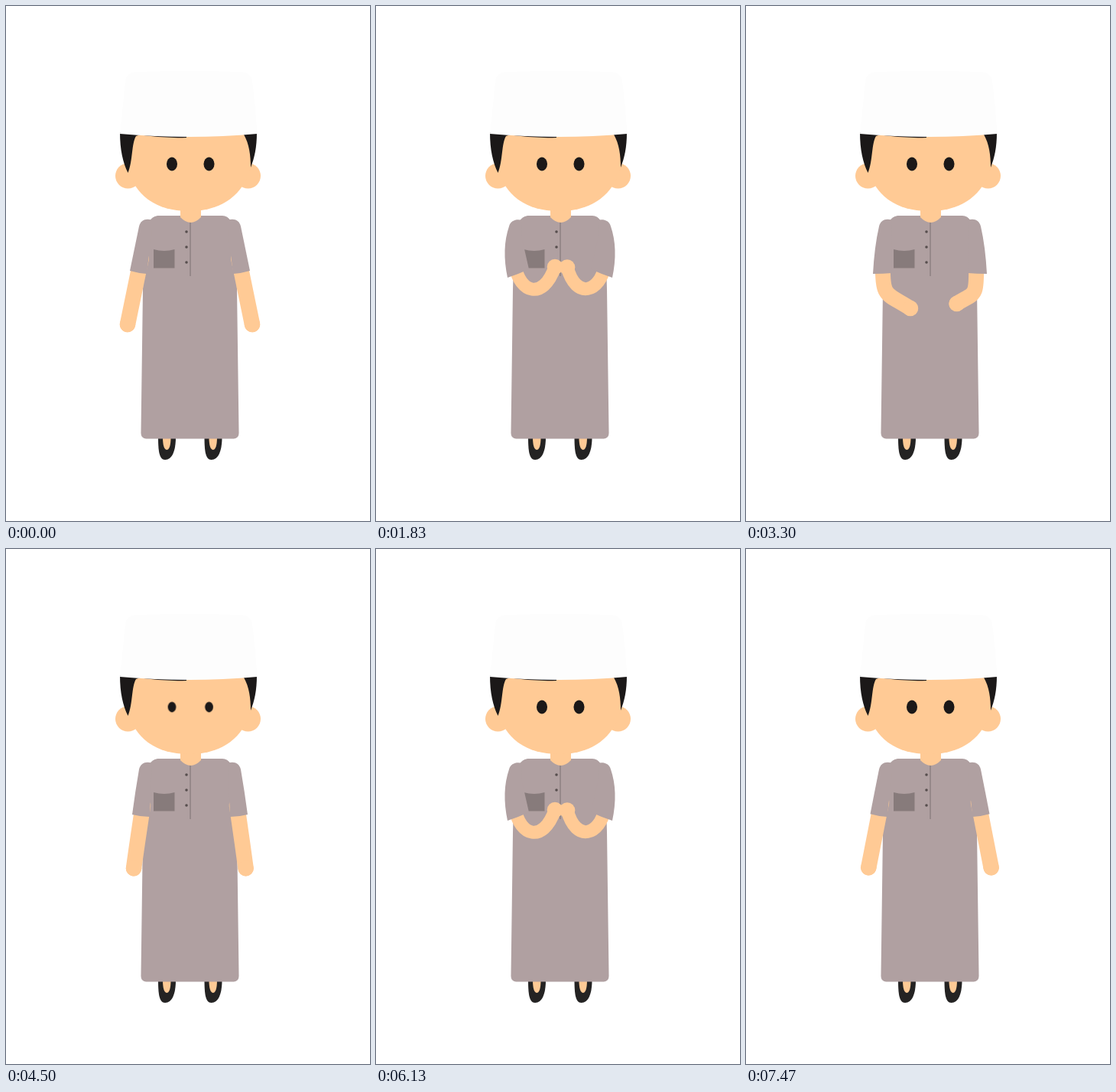
Animation, 476 px wide and 673 px high, one loop 7.51 s. Source, as an HTML page without scripts:

```html
<!DOCTYPE html>
<html lang="en">
<head>
<meta charset="utf-8">
<title>Boy raising his hands</title>
<style>
  html, body { margin: 0; width: 100%; height: 100%; overflow: hidden; background: #fff; }
  svg { display: block; width: 476px; height: 673px; }

  .skin { fill: #ffca95; }
  .shirt { fill: #b0a0a1; }
  .dark { fill: #1b1818; }
  .shoe { fill: #242323; }
  .pocket { fill: #877b7b; }
  .button { fill: #574e4e; }
  .seam { stroke: #85797a; stroke-width: 1.2; }
  .cap { fill: #fdfdfd; }

  .arm { fill: none; stroke: #ffca95; stroke-linecap: round; marker-end: url(#hand); }
  .arm, .sleeve, .eye { animation: 3755ms linear infinite; }
  .arm.left { animation-name: left-arm; }
  .arm.right { animation-name: right-arm; }
  .sleeve { animation-name: sleeve; }
  .eye { animation-name: blink; transform-box: fill-box; transform-origin: center; }

  /* Poses: hanging, lifting, half way, nearly joined, joined */
  @keyframes left-arm {
    0%, 12.9%, 100% { d: path("M176.7 330C171 358 165 387 159 416"); stroke-width: 20.5px; }
    19.8%, 93.9% { d: path("M179 335C175 362 170.5 390 166.5 417.5"); stroke-width: 20.5px; }
    25.8%, 87.9% { d: path("M179 338C178 382 184 375 215 395"); stroke-width: 20px; }
    30.8%, 83% { d: path("M180 340C184 380 198 378 229 365"); stroke-width: 18.5px; }
    43.9%, 69.2% { d: path("M182 340C188 374 218 386 234 341"); stroke-width: 17px; }
    12.9% { animation-timing-function: cubic-bezier(.5, 0, .8, .7); }
    30.8% { animation-timing-function: cubic-bezier(.15, .6, .4, 1); }
    69.2% { animation-timing-function: cubic-bezier(.6, 0, .85, .4); }
    93.9% { animation-timing-function: cubic-bezier(.2, .3, .5, 1); }
  }
  @keyframes right-arm {
    0%, 12.9%, 100% { d: path("M304.3 330C310 358 316 387 322 416"); stroke-width: 20.5px; }
    19.8%, 93.9% { d: path("M302 335C306 362 310 390 314 417.5"); stroke-width: 20.5px; }
    25.8%, 87.9% { d: path("M301 338C302 382 299 374 275.5 389"); stroke-width: 20px; }
    30.8%, 83% { d: path("M301 340C297 380 283 376 257.5 364"); stroke-width: 18.5px; }
    43.9%, 69.2% { d: path("M299 340C293 373 262 385 250 341.5"); stroke-width: 17px; }
    12.9% { animation-timing-function: cubic-bezier(.5, 0, .8, .7); }
    30.8% { animation-timing-function: cubic-bezier(.15, .6, .4, 1); }
    69.2% { animation-timing-function: cubic-bezier(.6, 0, .85, .4); }
    93.9% { animation-timing-function: cubic-bezier(.2, .3, .5, 1); }
  }
  @keyframes sleeve {
    0%, 12.9%, 100% { d: path("M174 288C176 279 184 277 191 280L190 300L184 350Q172 349 162 346Q168 317 174 288Z"); }
    19.8%, 93.9% { d: path("M174 288C176 279 184 277 191 280L190 300L188 350Q176 350 165 347Q169 317 174 288Z"); }
    25.8%, 87.9% { d: path("M174 288C176 279 184 277 191 280L190 300L191 349Q179 350 166 350Q168 314 174 288Z"); }
    30.8%, 83% { d: path("M174 288C176 279 184 278 191 280L190 300L197.5 344.5Q184 350 170 353Q166 315 174 288Z"); }
    43.9%, 69.2% { d: path("M174 288C176 280 184 278 191 280L190 300L200 344Q187 350 172 355Q164 317 174 288Z"); }
    12.9% { animation-timing-function: cubic-bezier(.5, 0, .8, .7); }
    30.8% { animation-timing-function: cubic-bezier(.15, .6, .4, 1); }
    69.2% { animation-timing-function: cubic-bezier(.6, 0, .85, .4); }
    93.9% { animation-timing-function: cubic-bezier(.2, .3, .5, 1); }
  }
  @keyframes blink {
    0%, 18.6%, 27.2%, 78.3%, 86.8%, 100% { transform: scale(1); }
    22.9%, 82.6% { transform: scale(.2); }
  }
</style>
</head>
<body>
<svg viewBox="0 0 476 673">
  <defs>
    <marker id="hand" markerUnits="userSpaceOnUse" markerWidth="24" markerHeight="24" refX="12" refY="12">
      <circle class="skin" cx="12" cy="12" r="10.3"/>
    </marker>
    <g id="foot">
      <path class="shoe" d="M199 563H222C222 582 217 593 208 593C200 593 199 580 199 563Z"/>
      <path class="skin" d="M205 563H215.5Q215.500 580 210 580Q205 579 205 563Z"/>
    </g>
  </defs>

  <use href="#foot"/>
  <use href="#foot" x="60.5"/>

  <!-- Robe -->
  <path class="shirt" d="M181 300C183 284 190 274 200 274H283C292 274 298 284 300 300L302 370L304.5 557Q305 565 298 565.500H183Q176 565 176.500 557L179 370Z"/>
  <path class="pocket" d="M193 318Q207 322 220.500 318V342.500H193Z"/>
  <path class="seam" d="M241 282V353"/>
  <g class="button">
    <circle cx="236" cy="295" r="1.8"/>
    <circle cx="236" cy="315" r="1.8"/>
    <circle cx="236" cy="335" r="1.8"/>
  </g>

  <!-- Head -->
  <g class="skin">
    <path d="M228 258V276Q241.500 290 255 276V258Z"/>
    <circle cx="159.500" cy="222" r="16.500"/>
    <circle cx="316.500" cy="222" r="16.500"/>
    <path d="M156 166H324C328 200 318 268 239 268C160 268 151 200 156 166Z"/>
  </g>
  <g class="dark">
    <path d="M149 165C149 188 153 205 159.500 218C166 202 164 180 170 170Q174 168 180 169Q208 173 236 172V165Z"/>
    <path d="M328 165C328 185 325 198 320 211C320 195 318 180 311 168V165Z"/>
    <ellipse class="eye" cx="217" cy="206.500" rx="7" ry="9"/>
    <ellipse class="eye" cx="265.500" cy="206.500" rx="7" ry="9"/>
  </g>
  <path class="cap" d="M149 167Q153 130 156 97Q158 87 170 86Q240 84 308 86Q320 87 322 97Q326 130 328.500 167Q240 175 149 167Z"/>

  <!-- Arms -->
  <path class="arm right" d="M304.300 330C310 358 316 387 322 416"/>
  <path class="arm left" d="M176.700 330C171 358 165 387 159 416"/>
  <g class="shirt">
    <path class="sleeve"/>
    <path class="sleeve" transform="matrix(-1 0 0 1 481 0)"/>
  </g>
</svg>
</body>
</html>
```
